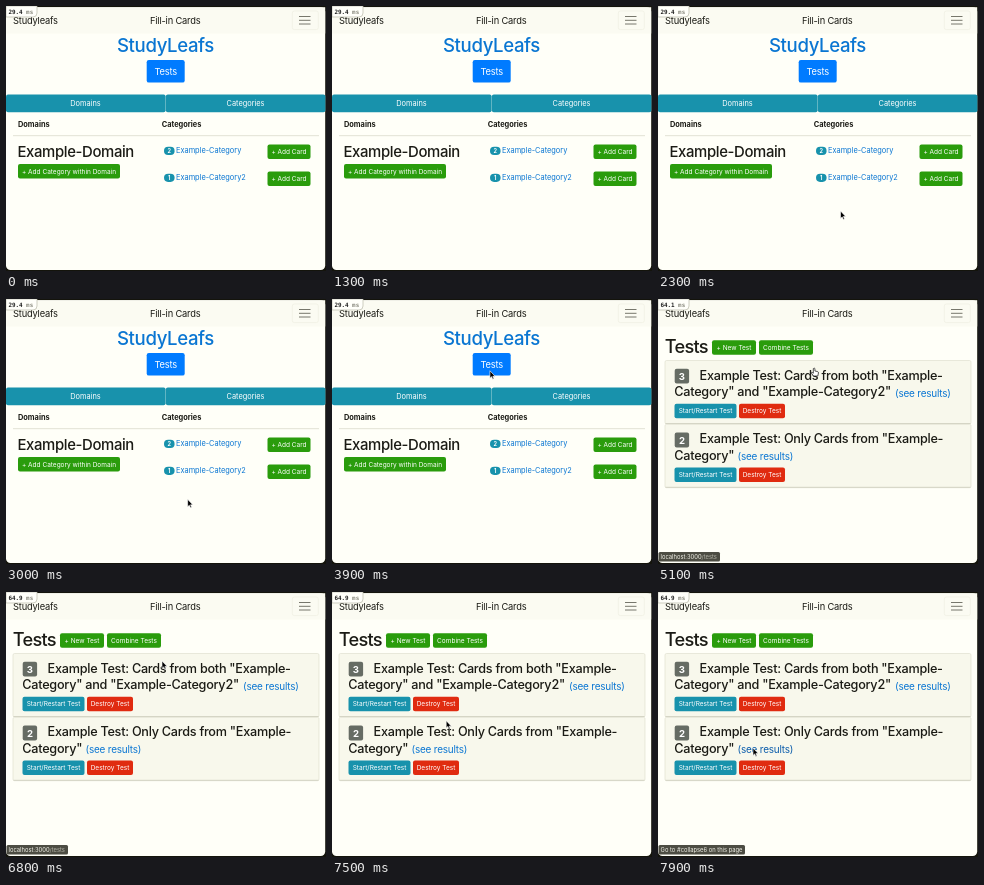
These frames come from a looping animation (320 px wide and 265 px high, 8 s). An HTML page:

```html
<!DOCTYPE html>
<html lang="en">
<head>
<meta charset="utf-8">
<title>Study cards demo</title>
<style>
  html, body { margin: 0; width: 100%; height: 100%; overflow: hidden; background: #14140c; }
  svg { display: block; width: 100%; height: 100%; }
  text { font-family: Inter, "Open Sans", sans-serif; font-optical-sizing: none; white-space: pre; }
  .mono { font-family: "DejaVu Sans Mono", monospace; }
</style>
</head>
<body>
<svg id="stage" viewBox="0 0 320 265" xmlns="http://www.w3.org/2000/svg"></svg>
<script>
const LOOP = 8000;
const INK = '#1b1b15', BLUE = '#0a76d2', TEAL = '#1892ac', GREEN = '#2a9c0c', RED = '#e02b10';
const PAGE = '#fffff8', PANEL = '#f8f8ec';

const rect = (x, y, w, h, fill, r = 2, extra = '') =>
  `<rect x="${x}" y="${y}" width="${w}" height="${h}" rx="${r}" fill="${fill}" ${extra}/>`;

const text = (x, y, size, str, { fill = INK, weight = 400, anchor = 'start', track = 0, extra = '' } = {}) =>
  `<text x="${x}" y="${y}" font-size="${size}" fill="${fill}" font-weight="${weight}" ` +
  `text-anchor="${anchor}" letter-spacing="${track}em" ${extra}>${str}</text>`;

const label = (x, y, size, str, opt = {}) =>
  text(x, y, size, str, { fill: '#fff', anchor: 'middle', ...opt });

const button = (x, y, w, str, fill) =>
  rect(x, y, w, 14.5, fill) + label(x + w / 2, y + 9.6, 6.5, str);

const heading = (x, y, size, str, opt = {}) =>
  text(x, y, size, str, { weight: 500, track: -0.02, ...opt });

function navbar() {
  const bars = [10.5, 14.3, 18].map(y => `<path d="M293 ${y}H304.5" stroke="#77776c" stroke-width="1"/>`);
  return rect(0, 1.2, 319.2, 26.3, '#fbfbf2', 0) +
    rect(286.3, 5, 26, 18.6, 'none', 2, 'stroke="#ecece0" stroke-width=".6"') +
    text(7, 17.6, 9.3, 'Studyleafs', { track: -0.02 }) +
    text(144, 17.6, 9.3, 'Fill-in Cards', { track: -0.02 }) + bars.join('');
}

function category(y, count, name) {
  return rect(158, y - 4, 10.6, 8.2, TEAL, 4.1) +
    label(163.3, y + 2.1, 5.6, count, { weight: 700 }) +
    text(170, y + 2.4, 7.4, name, { fill: BLUE }) +
    button(261.5, y - 6.2, 43, '+ Add Card', GREEN);
}

function homePage() {
  return heading(159.5, 46, 18.6, 'StudyLeafs', { fill: BLUE, anchor: 'middle' }) +
    rect(140.7, 54, 38, 22.6, '#007bff', 2.2, 'id="testsBtn"') +
    label(159.7, 68.8, 9.3, 'Tests', { track: -0.02 }) +
    rect(0, 88.6, 159.6, 17.6, TEAL) + rect(159.8, 88.6, 159.6, 17.6, TEAL) +
    label(79.5, 100.1, 7.4, 'Domains') + label(239.5, 100.1, 7.4, 'Categories') +
    text(12, 121, 7.4, 'Domains', { weight: 700 }) +
    text(155.8, 121, 7.4, 'Categories', { weight: 700 }) +
    '<path d="M7 129.7H313" stroke="#e2e2d4" stroke-width="1"/>' +
    heading(11.5, 151, 14.9, 'Example-Domain', { track: -0.025 }) +
    button(12, 158, 102, '+ Add Category within Domain', GREEN) +
    category(144.8, 2, 'Example-Category') +
    category(171.7, 1, 'Example-Category2');
}

function testCard(y, count, line1, line2, linkX, id) {
  return rect(7, y, 306, 63.4, PANEL, 1.5, 'stroke="#dcdccb" stroke-width=".6"') +
    `<path d="M7.5 ${y + 63}H312.5" stroke="#cfcfbd" stroke-width=".8"/>` +
    rect(16.7, y + 8.3, 14.4, 14.8, '#666c64') +
    label(23.9, y + 19.2, 9.6, count, { weight: 700 }) +
    heading(41.6, y + 19, 12.65, line1) + heading(16.3, y + 35.7, 12.65, line2) +
    text(linkX, y + 36, 9.95, '(see results)', { fill: BLUE, track: -0.02, extra: `id="${id}"` }) +
    button(16.5, y + 43.2, 62, 'Start/Restart Test', TEAL) +
    button(81, y + 43.2, 46, 'Destroy Test', RED);
}

function testsPage() {
  return heading(6.8, 54, 18.2, 'Tests', { track: -0.04 }) +
    button(54, 41.2, 44, '+ New Test', GREEN) +
    button(101, 41.2, 54, 'Combine Tests', GREEN) +
    testCard(61.5, 3, 'Example Test: Cards from both "Example-', 'Category" and "Example-Category2"', 237, 'link1') +
    testCard(125.3, 2, 'Example Test: Only Cards from "Example-', 'Category"', 79.5, 'link2');
}

const statusBar = (id, w, str) =>
  `<g id="${id}">${rect(0.5, 253, w, 9.6, '#4d4d43', 1.5)}${text(2.6, 259.8, 5.8, str, { fill: '#f4f4ea' })}</g>`;

const stage = document.getElementById('stage');
stage.innerHTML =
  rect(0, 0, 320, 265, '#14140c', 0) +
  rect(0, 1.2, 319.2, 262.8, PAGE, 4.5) +
  navbar() +
  `<g id="home">${homePage()}</g><g id="tests">${testsPage()}</g>` +
  statusBar('urlBar', 61.5, 'localhost:3000<tspan fill="#b4b4a8">/tests</tspan>') +
  statusBar('goBar', 86.5, 'Go to #collapse6 on this page') +
  '<path d="M0 0H31V7Q31 11 27 11H0Z" fill="#fffffa" stroke="#b9b9aa" stroke-width=".7"/>' +
  '<text class="mono" x="2.4" y="7.8" font-size="5.9" font-weight="700" fill="#222">' +
  '<tspan id="timer"></tspan><tspan fill="#8a8a7e"> ms</tspan></text>' +
  '<circle id="ring" cx="156.5" cy="69.5" fill="none" stroke="#17170f" stroke-width="1.1"/>' +
  '<g id="cursor">' +
  '<path id="arrow" d="M0 0V7.4L1.7 5.9L2.8 8.5L4 8L2.9 5.5H5.2Z" fill="#000" stroke="#fff" stroke-width=".6"/>' +
  '<path id="hand" d="M-.8 .6Q0 -.6 .8 .6V3L3.6 3.6Q4.4 3.9 4.3 5L3.7 8H-.6L-2.8 5Q-2.6 3.8 -1.7 4.5L-.8 5.2Z" ' +
  'fill="#fff" stroke="#111" stroke-width=".7"/></g>';

const el = id => document.getElementById(id);
const show = (id, on) => el(id).setAttribute('display', on ? 'inline' : 'none');
const ease = p => p * p * (3 - 2 * p);

// Pointer path: time, x, y
const path = [
  [1700, 196, 264], [2200, 182.5, 205], [2900, 182.5, 205], [3800, 158, 72],
  [4400, 157, 69], [5300, 156, 69], [7000, 156, 69], [7800, 95, 156]
];

function pointerAt(t) {
  const i = path.findIndex(k => k[0] > t);
  if (i === 0) return path[0].slice(1);
  if (i < 0) return path[path.length - 1].slice(1);
  const [t0, x0, y0] = path[i - 1], [t1, x1, y1] = path[i];
  const p = ease((t - t0) / (t1 - t0));
  return [x0 + (x1 - x0) * p, y0 + (y1 - y0) * p];
}

function draw(t) {
  const onTests = t >= 5100;
  const hover = t >= 4000 && !onTests;
  const hand = t >= 4000 && t < 5300;
  show('home', !onTests);
  show('tests', onTests);
  show('urlBar', t >= 4300 && t < 7200);
  show('goBar', t >= 7600);
  el('testsBtn').setAttribute('fill', hover ? '#0767ad' : '#007bff');
  el('link2').setAttribute('fill', t >= 7700 ? '#0a5cab' : BLUE);
  el('timer').textContent = t < 5100 ? '29.4' : t < 5200 ? '64.1' : '64.9';

  const [x, y] = pointerAt(t);
  show('cursor', t >= 1700);
  show('arrow', !hand);
  show('hand', hand);
  el('cursor').setAttribute('transform', `translate(${x.toFixed(2)} ${y.toFixed(2)})`);

  const press = (t - 4800) / 200;
  show('ring', press >= 0 && !onTests);
  el('ring').setAttribute('r', 6 + 8 * Math.min(1, Math.max(0, press)));
}

const start = performance.now();
function tick() {
  draw((performance.now() - start) % LOOP);
  requestAnimationFrame(tick);
}
tick();
</script>
</body>
</html>
```
